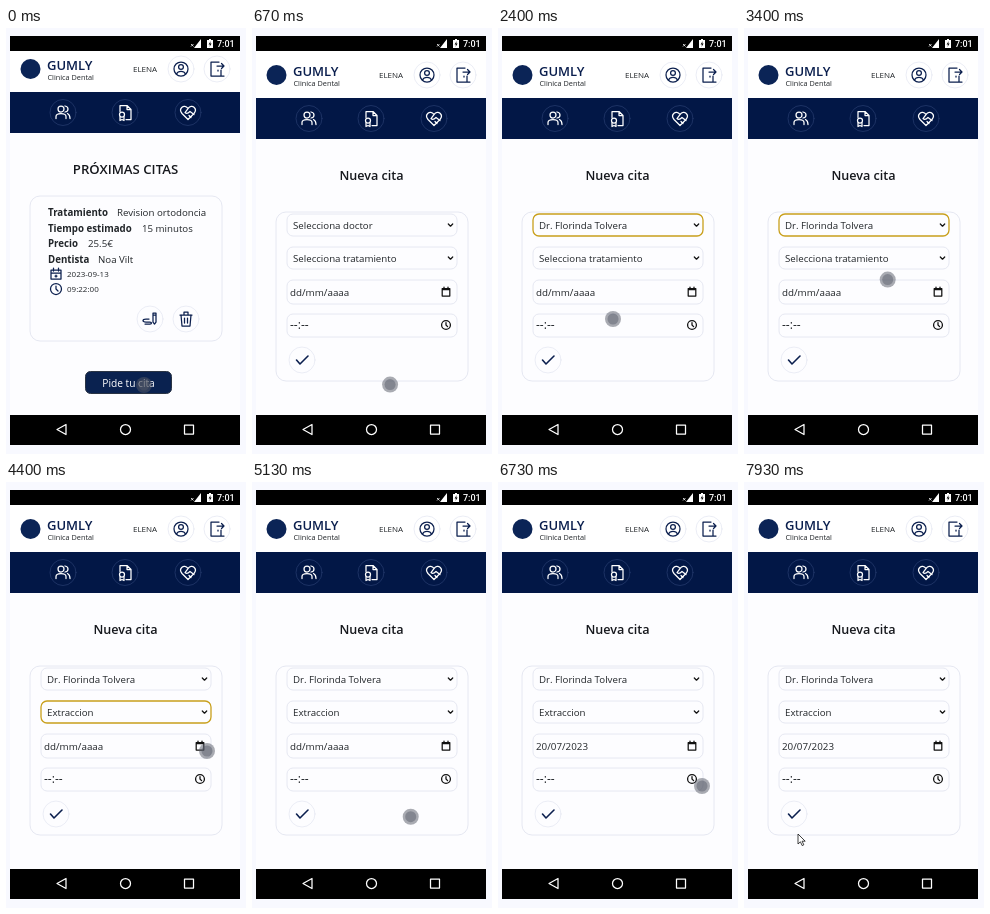
An HTML page that plays this animation: 240 by 426 pixels, repeating every 8 s.

```html
<!DOCTYPE html>
<html lang="es">
<head>
<meta charset="utf-8">
<title>Clinica Dental</title>
<style>
html, body { margin: 0; width: 100%; height: 100%; overflow: hidden; background: #f8f9ff; }
svg { display: block; width: 100vw; height: 100vh; }
text { font: 9.7px "Open Sans", "Noto Sans", sans-serif; fill: #212529; white-space: pre; }
.title { font-size: 12.6px; font-weight: 600; text-anchor: middle; fill: #16181d; }
.bold { font-weight: 700; }
.small { font-size: 8px; }
.icon { fill: none; stroke: #0b1f4e; stroke-width: 1.25; stroke-linecap: round; stroke-linejoin: round; }
.dark { stroke: #111; }
.light { stroke: #fff; }
.ring { fill: none; stroke: #e6e9f3; stroke-width: .8; }
.light .ring { stroke: #24396b; }
.box { fill: #fdfdff; stroke: #e6e8f2; stroke-width: 1; }
.box.focus { stroke: #c9a01c; stroke-width: 1.3; }
</style>
</head>
<body>
<svg viewBox="0 0 240 426" preserveAspectRatio="none">
  <defs>
    <g id="calendar"><path d="M-5-4H5V5H-5ZM-5-1H5M-2.5-6V-3M2.5-6V-3M0 1V3M-1 2H1"/></g>
    <g id="clock"><circle r="5.5"/><path d="M0-3V0L2 2"/></g>
    <g id="chevron"><path d="M-2.2-1L0 1.2L2.2-1"/></g>
  </defs>
  <rect width="240" height="426" fill="#f8f9ff"/>
  <rect x="4" y="23" width="230" height="364" fill="#fdfdff"/>

  <g id="header">
    <rect x="4" y="23" width="230" height="47" fill="#fff"/>
    <circle cx="24.5" cy="47" r="10" fill="#0b2456"/>
    <text x="41" y="48" style="font-size:13px;font-weight:600;fill:#0b1f4e">GUMLY</text>
    <text x="41.5" y="58" style="font-size:7.3px">Clinica Dental</text>
    <text x="127" y="50" class="small">ELENA</text>
    <g class="icon" transform="translate(175 47)">
      <circle class="ring" r="13"/>
      <circle r="7"/><circle cy="-2" r="2.4"/><path d="M-4.5 5C-3 1.5 3 1.5 4.5 5"/>
    </g>
    <g class="icon" transform="translate(211 47)">
      <circle class="ring" r="13"/>
      <path d="M2-7H-6V7H4V1M-6 7H7M0-3H7M4.5-5.5L7-3L4.5-.5M1 1V2"/>
    </g>
    <rect x="4" y="70" width="230" height="41" fill="#021746"/>
    <g class="icon light" transform="translate(57 90.5)">
      <circle class="ring" r="13"/>
      <circle cx="-2" cy="-3.5" r="3"/>
      <path d="M-7 6V4C-7 0 3 0 3 4V6M2-6.5C6-6 6-1 2-.5M4.5 1C6.5 2 7 3 7 6"/>
    </g>
    <g class="icon light" transform="translate(119 90.5)">
      <circle class="ring" r="13"/>
      <path d="M-5-1V-7H2L6-3V7H1M2-7V-3H6M-5 4V8L-3 7L-1 8V4"/><circle cx="-3" cy="2" r="2.5"/>
    </g>
    <g class="icon light" transform="translate(182 90.5)">
      <circle class="ring" r="13"/>
      <path d="M0 7L-6 1C-10-4-4-9 0-4C4-9 10-4 6 1ZM0-4L-3 0C-1 2 1 0 2-1L6 2M1 3L3 5"/>
    </g>
  </g>

  <g id="appointments">
    <text class="title" x="119.5" y="146" style="font-size:13.2px">PRÓXIMAS CITAS</text>
    <rect class="box" x="24" y="168" width="192" height="145" rx="10"/>
    <g id="details"></g>
    <use href="#calendar" class="icon" x="50" y="246"/>
    <text class="small" x="61" y="249">2023-09-13</text>
    <use href="#clock" class="icon" x="50" y="261"/>
    <text class="small" x="61" y="264">09:22:00</text>
    <g class="icon" transform="translate(144 291)">
      <circle class="ring" r="13"/>
      <path d="M3-6H6V3L4.5 5L3 3ZM3-4H6M-1 0H-4C-8 0-8 3-4 3H0C2 3 2 5 0 5H-5"/>
    </g>
    <g class="icon" transform="translate(180 291)">
      <circle class="ring" r="13"/>
      <path d="M-6-4H6M-2-4V-7H2V-4M-5-4L-4 7H4L5-4M-1.5-1V4M1.5-1V4"/>
    </g>
    <rect x="79.5" y="343.5" width="86" height="22" rx="5" fill="#0a2250" stroke="#2a3444"/>
    <text x="122.5" y="358.5" text-anchor="middle" style="font-size:10.2px;fill:#fff">Pide tu cita</text>
  </g>

  <g id="form">
    <text class="title" x="119.5" y="152">Nueva cita</text>
    <rect class="box" x="24" y="184" width="192" height="169" rx="10"/>
    <g id="fields"></g>
    <use href="#chevron" class="icon dark" x="198.5" y="197"/>
    <use href="#chevron" class="icon dark" x="198.5" y="230"/>
    <g class="icon dark" transform="translate(194 264)">
      <path d="M-3.8-3.5H3.8V4H-3.8ZM-3.8-2.5H3.8M-2-5V-3M2-5V-3"/>
    </g>
    <use href="#clock" class="icon dark" transform="translate(194 297) scale(.8)" style="stroke-width:1.6"/>
    <g class="icon" transform="translate(50 332)">
      <circle class="ring" r="13"/>
      <path d="M-5.5 0L-2 4L6-4" style="stroke-width:1.6"/>
    </g>
  </g>

  <path d="M4 8H234V23H4ZM4 387H234V417H4Z"/>
  <path d="M188 20H195V11ZM201 12H203V11H205V12H207V20H201Z" fill="#fff"/>
  <path d="M185 16L187.5 18.5M187.5 16L185 18.5" stroke="#fff" stroke-width=".8"/>
  <path d="M204.7 13L202.6 16.5H204L203.5 19L205.6 15.5H204.2Z"/>
  <text x="211" y="19" style="font:500 9px Roboto,sans-serif;fill:#fff">7:01</text>
  <g class="icon light">
    <path d="M60 396.5V406.5L51 401.5ZM178.5 397H187.5V406H178.5Z"/>
    <circle cx="119.5" cy="401.5" r="5"/>
  </g>

  <g id="touch">
    <circle r="8" fill="#555966" fill-opacity=".5"/>
    <circle r="5.5" fill="#555966" fill-opacity=".45"/>
  </g>
  <path id="arrow" d="M0 0V10L2.4 7.8L4.2 11.6L5.8 10.8L4.1 7.2H7.2Z" fill="#fff" stroke="#111" stroke-width=".8"/>
</svg>
<script>
const LOOP = 8000;
const FORM_OPENS = 650, DOCTOR_SET = 2050, TREATMENT_SET = 3650, FOCUS_LOST = 4650, DATE_SET = 6300;
const byId = id => document.getElementById(id);

function add(parent, tag, attributes, content = "") {
  const node = document.createElementNS("http://www.w3.org/2000/svg", tag);
  for (const name in attributes) node.setAttribute(name, attributes[name]);
  node.textContent = content;
  return parent.appendChild(node);
}

[
  ["Tratamiento", 111, "Revision ortodoncia"],
  ["Tiempo estimado", 136, "15 minutos"],
  ["Precio", 82, "25.5€"],
  ["Dentista", 92, "Noa Vilt"]
].forEach(([label, x, value], i) => {
  const y = 188 + i * 15.5;
  add(byId("details"), "text", { x: 42, y, class: "bold" }, label);
  add(byId("details"), "text", { x, y }, value);
});

// Each field: top, height, text x, baseline, font size
const fields = [
  [186, 22, 41, 201, 9.7], [219, 22, 41, 234, 9.7], [252, 24, 38, 268, 9.8], [286, 23, 38, 301, 12]
].map(([y, height, textX, baseline, size]) => ({
  box: add(byId("fields"), "rect", { class: "box", x: 35, y, width: 170, height, rx: 6 }),
  text: add(byId("fields"), "text", { x: textX, y: baseline, style: `font-size:${size}px` })
}));

// Pointer stops: time, x, y
const stops = [
  [0, 138, 357], [650, 138, 357], [1330, 164, 203], [1550, 164, 203], [2050, 125, 260],
  [2400, 115, 291], [2950, 150, 231], [3200, 150, 231], [3650, 135, 280], [4350, 201, 269],
  [4650, 201, 269], [5600, 118, 398], [5950, 118, 398], [6650, 204, 304], [6950, 204, 304],
  [7750, 54, 352], [LOOP, 54, 352]
];

function pointerAt(t) {
  const i = stops.findIndex(stop => stop[0] > t);
  const [t0, x0, y0] = stops[i - 1], [t1, x1, y1] = stops[i];
  const p = (t - t0) / (t1 - t0), eased = p * p * (3 - 2 * p);
  return [x0 + (x1 - x0) * eased, y0 + (y1 - y0) * eased];
}

function show(id, visible) {
  byId(id).setAttribute("visibility", visible ? "visible" : "hidden");
}

function render(now) {
  const t = now % LOOP, formOpen = t >= FORM_OPENS;
  show("appointments", !formOpen);
  show("form", formOpen);
  byId("header").setAttribute("transform", `translate(0 ${formOpen ? 0 : -6})`);

  const values = [
    t < DOCTOR_SET ? "Selecciona doctor" : "Dr. Florinda Tolvera",
    t < TREATMENT_SET ? "Selecciona tratamiento" : "Extraccion",
    t < DATE_SET ? "dd/mm/aaaa" : "20/07/2023",
    "--:--"
  ];
  const focused = t < DOCTOR_SET || t >= FOCUS_LOST ? -1 : t < TREATMENT_SET ? 0 : 1;
  fields.forEach(({ box, text }, i) => {
    text.textContent = values[i];
    box.classList.toggle("focus", i === focused);
  });

  const isArrow = t >= 5350 && t < 6200 || t >= 7450;
  show("arrow", isArrow);
  show("touch", !isArrow);
  byId(isArrow ? "arrow" : "touch").setAttribute("transform", `translate(${pointerAt(t)})`);
}

const start = performance.now();
function frame() {
  render(performance.now() - start);
  requestAnimationFrame(frame);
}
frame();
</script>
</body>
</html>
```
